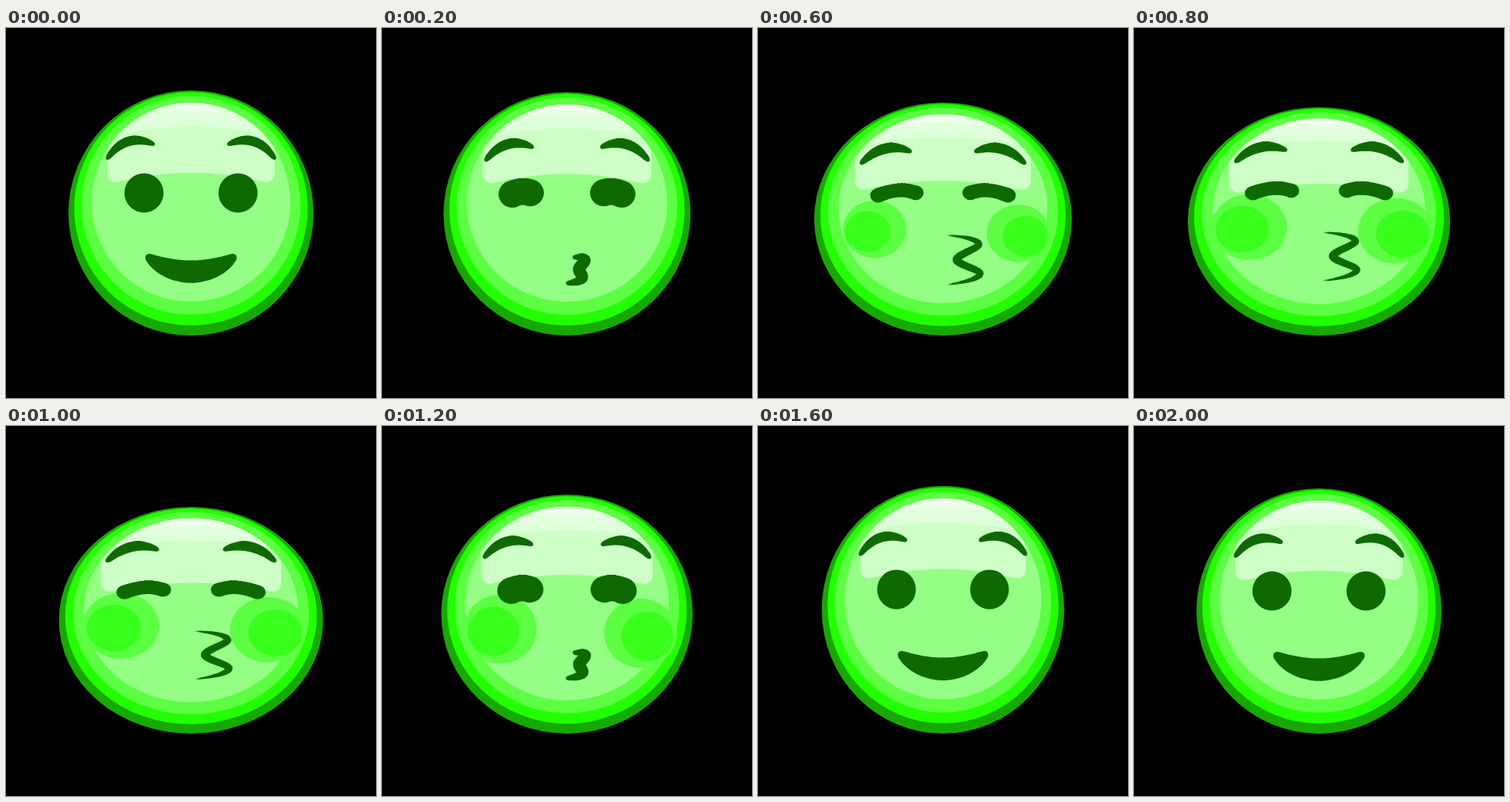
Recreate the animation shown at these times as an HTML page with a canvas. Size 480 by 480 pixels, loop 2.1 s.

```html
<!DOCTYPE html>
<html lang="en">
<head>
<meta charset="utf-8">
<title>Kissing face</title>
<style>
html, body { margin: 0; width: 100%; height: 100%; overflow: hidden; background: #000; }
canvas { display: block; width: 480px; height: 480px; }
</style>
</head>
<body>
<canvas id="stage" width="480" height="480"></canvas>
<script>
const ctx = document.getElementById('stage').getContext('2d');
const LOOP = 2100, STEP = 100, CX = 240, FLOOR = 399;
const DARK = '#0d6900', MID = '#5cff42';

const lerp = (a, b, k) => a + (b - a) * k;
const clamp = k => Math.min(1, Math.max(0, k));
const sine = k => (1 - Math.cos(Math.PI * k)) / 2;
const out = k => 1 - (1 - k) ** 2;
const ramp = (t, from, to, ease = sine) => ease(clamp((t - from) / (to - from)));

// A feature is a brush stroke: a spine through a few points, its radius at the tips and in the middle.
const stroke = (tip, mid, ...pts) => ({ tip, mid, pts });
const morph = (a, b, k) => stroke(
  lerp(a.tip, b.tip, k), lerp(a.mid, b.mid, k),
  ...a.pts.map((p, i) => p.map((v, j) => lerp(v, b.pts[i][j], k)))
);

const center = [179, 214];
const eyeOpen = stroke(25.4, 25.4, center, center, center);
const eyeShut = stroke(9.9, 9.4, [160, 214.5], [184.5, 207.8], [206.2, 211]);
const browCalm = stroke(2.5, 6.3, [132, 168.5], [158.5, 147.3], [190.5, 150.5]);
const browKiss = stroke(2.6, 7.1, [139.7, 170.3], [168.5, 150.8], [199, 154.5]);
const smile = stroke(4.3, 14.5, [185, 297.5], [210, 311], [240, 316.3], [270, 311], [295, 297.5]);
const pucker = stroke(2.5, 8, [249.7, 296.7], [263.4, 299.8], [255.6, 312], [259.5, 324.4], [241, 330.6]);
const kiss = stroke(0.7, 5.2, [246.8, 269.2], [284.3, 280.8], [257, 302.4], [285.8, 321.9], [246.8, 336.3]);

// Catmull-Rom spline with quadratically extended ends.
function spline(pts, s) {
  const n = pts.length - 1, i = Math.min(n - 1, Math.floor(s * n)), u = s * n - i;
  const extend = (a, b, c, j) => 3 * a[j] - 3 * b[j] + c[j];
  return [0, 1].map(j => {
    const b = pts[i][j], c = pts[i + 1][j];
    const a = i ? pts[i - 1][j] : extend(pts[0], pts[1], pts[2], j);
    const d = i < n - 1 ? pts[i + 2][j] : extend(pts[n], pts[n - 1], pts[n - 2], j);
    return b + u / 2 * (c - a + u * (2 * a - 5 * b + 4 * c - d + u * (3 * (b - c) + d - a)));
  });
}

function paint({ tip, mid, pts }) {
  const N = 120;
  ctx.beginPath();
  for (let i = 0; i <= N; i++) {
    const [x, y] = spline(pts, i / N);
    const r = lerp(tip, mid, clamp(Math.sin(Math.PI * i / N)) ** 0.7);
    ctx.moveTo(x + r, y);
    ctx.arc(x, y, r, 0, 2 * Math.PI);
  }
  ctx.fillStyle = DARK;
  ctx.fill();
}

function disc(x, y, r, color) {
  ctx.beginPath();
  ctx.arc(x, y, r, 0, 2 * Math.PI);
  ctx.fillStyle = color;
  ctx.fill();
}

function stretch(t) {
  if (t < 1000) return lerp(1, 0.9245, ramp(t, 0, 1000));
  if (t < 1400) return lerp(0.9245, 1.025, ramp(t, 1000, 1400));
  if (t < 1800) return lerp(1.025, 0.996, ramp(t, 1400, 1800));
  return lerp(0.996, 1, ramp(t, 1800, 2000));
}

// Drawn inside the disc painted last.
function gloss() {
  const left = 131.5, right = 2 * CX - left;
  ctx.save();
  ctx.clip();
  ctx.beginPath();
  ctx.moveTo(left, 90);
  ctx.arcTo(left, 202, 148, 199, 11);
  ctx.quadraticCurveTo(CX, 176, 332, 199);
  ctx.arcTo(right, 202, right, 90, 11);
  ctx.lineTo(right, 90);
  ctx.fillStyle = '#cdffc6';
  ctx.fill();

  const shine = ctx.createLinearGradient(0, 96, 0, 132);
  shine.addColorStop(0, '#f4fff2');
  shine.addColorStop(0.5, '#e2ffde');
  shine.addColorStop(1, '#dcffd8');
  ctx.beginPath();
  ctx.moveTo(120, 90);
  ctx.lineTo(120, 144);
  ctx.quadraticCurveTo(CX, 112, 360, 144);
  ctx.lineTo(360, 90);
  ctx.fillStyle = shine;
  ctx.fill();
  ctx.restore();
}

function cheek(x, y, r, dx, dy) {
  disc(x, y, r, MID);
  disc(x + dx, y + dy, r * 0.71, '#38ff1c');
}

function draw(t) {
  const sy = stretch(t), sx = 1 + 1.03 * (1 - sy);
  const rise = ramp(t, 400, 800);
  const lift = 13.8 * rise * (1 - ramp(t, 1000, 1350));
  const cheekLift = 12 * rise * (1 - ramp(t, 1000, 1200));
  const shut = ramp(t, 0, 400) * (1 - ramp(t, 1000, 1400));
  const blush = 46 * ramp(t, 200, 850, out) * (1 - ramp(t, 1200, 1500));

  ctx.setTransform(1, 0, 0, 1, 0, 0);
  ctx.fillStyle = '#000';
  ctx.fillRect(0, 0, 480, 480);
  ctx.setTransform(sx, 0, 0, sy, CX * (1 - sx), FLOOR * (1 - sy));

  disc(CX, 240, 159, '#17a804');
  disc(CX, 234.5, 151.5, '#22ff00');
  disc(CX, 230, 142, MID);
  disc(CX, 226, 129, '#94ff84');
  gloss();

  if (blush > 0.1) {
    cheek(CX - 84.5, 260 - cheekLift, blush, -8.5, 3);
    cheek(CX + 93, 265.5 - cheekLift, blush, 8.5, 4);
  }

  ctx.translate(0, -lift);
  paint(shut < 0.5 ? morph(smile, pucker, shut * 2) : morph(pucker, kiss, shut * 2 - 1));
  for (let side = 0; side < 2; side++) {
    paint(morph(eyeOpen, eyeShut, shut));
    paint(morph(browCalm, browKiss, shut));
    ctx.transform(-1, 0, 0, 1, 2 * CX, 0);
  }
}

function tick(now) {
  draw(Math.floor(now % LOOP / STEP) * STEP);
  requestAnimationFrame(tick);
}
draw(0);
requestAnimationFrame(tick);
</script>
</body>
</html>
```
